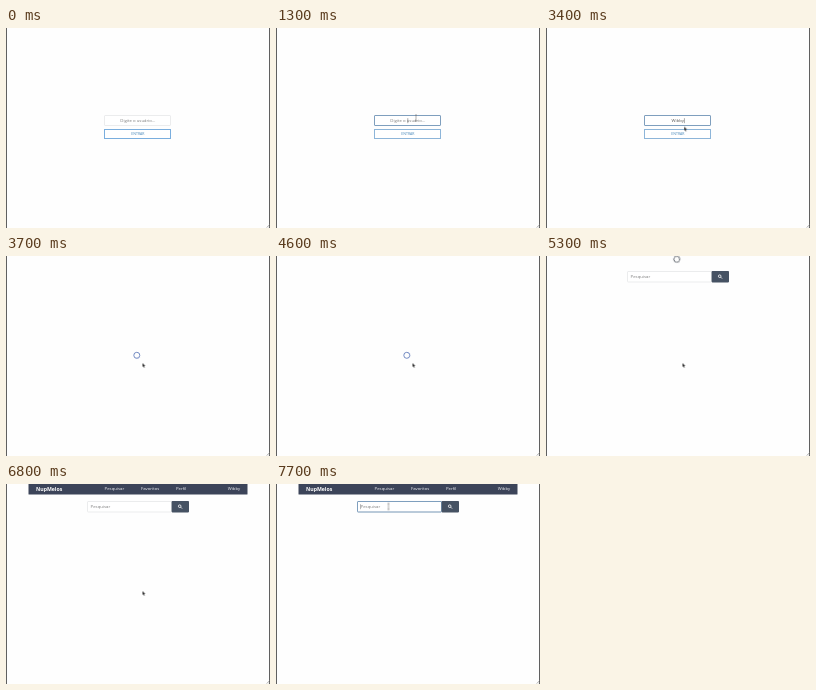
Recreate the animation shown at these times as an HTML page. Size 264 by 200 pixels, loop 8000 ms.

```html
<!DOCTYPE html>
<html lang="pt">
<head>
<meta charset="utf-8">
<title>Login e pesquisa</title>
<style>
html, body { margin: 0; width: 100%; height: 100%; overflow: hidden; background: #fefefe; }
svg { display: block; width: 100vw; height: 100vh; font: 4.3px "Open Sans", "Noto Sans", sans-serif; }
.mid { text-anchor: middle; }
.hint { fill: #7d7d7d; }
.field { fill: #fff; stroke: #ebeced; }
.focus { fill: none; stroke: #7f9fbe; }
.enter { fill: #fff; stroke: #8db5d9; }
.active { fill: none; stroke: #7aaede; }
.caret { stroke: #555; stroke-width: .5; }
.nav text { fill: #f4f5f8; }
.nav .brand { font-size: 5.2px; font-weight: 700; fill: #fff; }
.spin { fill: none; stroke-width: .9; }
.turn { transform-box: fill-box; transform-origin: center; animation: turn 1.2s linear infinite; }
.search { animation: push 8s step-end infinite; }
.pointer { animation: travel 8s ease-in-out infinite; }
@keyframes turn { to { transform: rotate(360deg); } }
@keyframes push {
  0% { transform: none; }
  82.5%, 100% { transform: translateY(2px); }
}
@keyframes travel {
  0%, 3.5% { transform: translate(34px, 86px); animation-timing-function: ease-out; }
  13%, 40.5% { transform: translate(140px, 90px); }
  44.5%, 86% { transform: translate(136.5px, 107px); }
  93.5%, 100% { transform: translate(112.5px, 22.5px); }
}
</style>
</head>
<body>
<svg viewBox="0 0 264 200" preserveAspectRatio="none">
  <defs>
    <path id="arrow" d="M0 0v4l.9-.8.7 1.6.7-.3-.7-1.6h1.2z" fill="#333"/>
    <path id="beam" d="M-1-3h2M0-3v6M-1 3h2" fill="none" stroke="#777" stroke-width=".6"/>
  </defs>
  <rect width="264" height="200" fill="#fefefe"/>

  <g data-show="0 3600">
    <rect class="field" x="98.5" y="87.5" width="66" height="10" rx=".5"/>
    <rect class="focus" x="98.5" y="87.5" width="66" height="10" rx=".5" data-show="1050 3500"/>
    <g data-show="0 1570">
      <text class="hint mid" x="131.8" y="94.2">Digite o usuário...</text>
    </g>
    <path class="caret" d="M131.8 90.2v5" data-show="1050 1570"/>
    <g id="typed"></g>
    <rect class="enter" x="98.5" y="101.5" width="66" height="9"/>
    <rect class="active" x="98.5" y="101.5" width="66" height="9" data-show="0 1050"/>
    <text class="mid" x="131.9" y="107.4" fill="#4385b8" font-size="3.5">ENTRAR</text>
  </g>

  <g class="spin" data-show="3600 5150">
    <circle cx="130.8" cy="99.3" r="3" stroke="#667fbd"/>
    <g class="turn">
      <circle cx="130.8" cy="99.3" r="3" stroke="#a3b2da" stroke-dasharray="4 14.85"/>
    </g>
  </g>

  <g data-show="5150 8000">
    <g class="search">
      <rect class="field" x="81.5" y="15.5" width="84" height="10.5" rx=".5"/>
      <rect class="focus" x="81.5" y="15.5" width="84" height="10.5" rx=".5" data-show="7500 8000"/>
      <text class="hint" x="84.6" y="22.3">Pesquisar</text>
      <rect x="165.6" y="15" width="17.4" height="11.4" rx=".8" fill="#465263"/>
      <g fill="none" stroke="#fff">
        <circle cx="173.7" cy="20.2" r="1.3" stroke-width=".8"/>
        <path d="M174.7 21.2l1.3 1.3" stroke-width=".9"/>
      </g>
      <path class="caret" d="M84.3 18.2v5" data-show="7500 8000"/>
    </g>
  </g>

  <g data-show="5150 6600">
    <path class="spin turn" d="M130.8 0l2.8 1.6v3.3l-2.8 1.6-2.8-1.6v-3.3z" stroke="#5b6068"/>
  </g>

  <g class="nav" data-show="6600 8000">
    <rect x="22.5" y="-1" width="219" height="11.6" rx=".6" fill="#3c4459"/>
    <text class="brand" x="30" y="6.7">NupMelos</text>
    <text x="98.6" y="6.4">Pesquisar</text>
    <text x="135" y="6.4">Favoritos</text>
    <text x="170" y="6.4">Perfil</text>
    <text id="user" x="234.2" y="6.4" text-anchor="end"></text>
  </g>

  <g class="pointer">
    <use href="#arrow" data-show="300 800"/>
    <use href="#beam" data-show="800 3400"/>
    <use href="#arrow" data-show="3400 7300"/>
    <use href="#beam" data-show="7300 8000"/>
  </g>

  <path d="M.5 0v200M263.5 0v200" stroke="#606060"/>
  <path d="M260.5 199.5l3-3M262 199.5l1.5-1.5" stroke="#999" stroke-width=".6"/>
</svg>
<script>
const LOOP = 8000, NAME = 'Wibby', CENTER = 131.8;
const TYPE_START = 1570, TYPE_STEP = 220, TYPE_END = 3600;
const typed = document.getElementById('typed');
document.getElementById('user').textContent = NAME;

function add(parent, tag, attrs) {
  const el = document.createElementNS(parent.namespaceURI, tag);
  for (const key in attrs) el.setAttribute(key, attrs[key]);
  return parent.appendChild(el);
}

// Each typed prefix, with its caret, stays until the next one.
for (let i = 1; i <= NAME.length; i++) {
  const from = TYPE_START + (i - 1) * TYPE_STEP;
  const to = i < NAME.length ? from + TYPE_STEP : TYPE_END;
  const group = add(typed, 'g', { 'data-show': `${from} ${to}` });
  const label = add(group, 'text', { class: 'mid', x: CENTER, y: 94.2, fill: '#555' });
  label.textContent = NAME.slice(0, i);
  const end = CENTER + label.getComputedTextLength() / 2 + .4;
  add(group, 'path', { class: 'caret', d: `M${end} 90.2v5` });
}

for (const el of document.querySelectorAll('[data-show]')) {
  const [from, to] = el.dataset.show.split(' ').map(ms => ms / LOOP);
  const step = (offset, opacity) => ({ offset, opacity, easing: 'step-end' });
  el.animate([step(0, 0), step(from, 1), step(to, 0), step(1, 0)],
    { duration: LOOP, iterations: Infinity });
}
</script>
</body>
</html>
```
